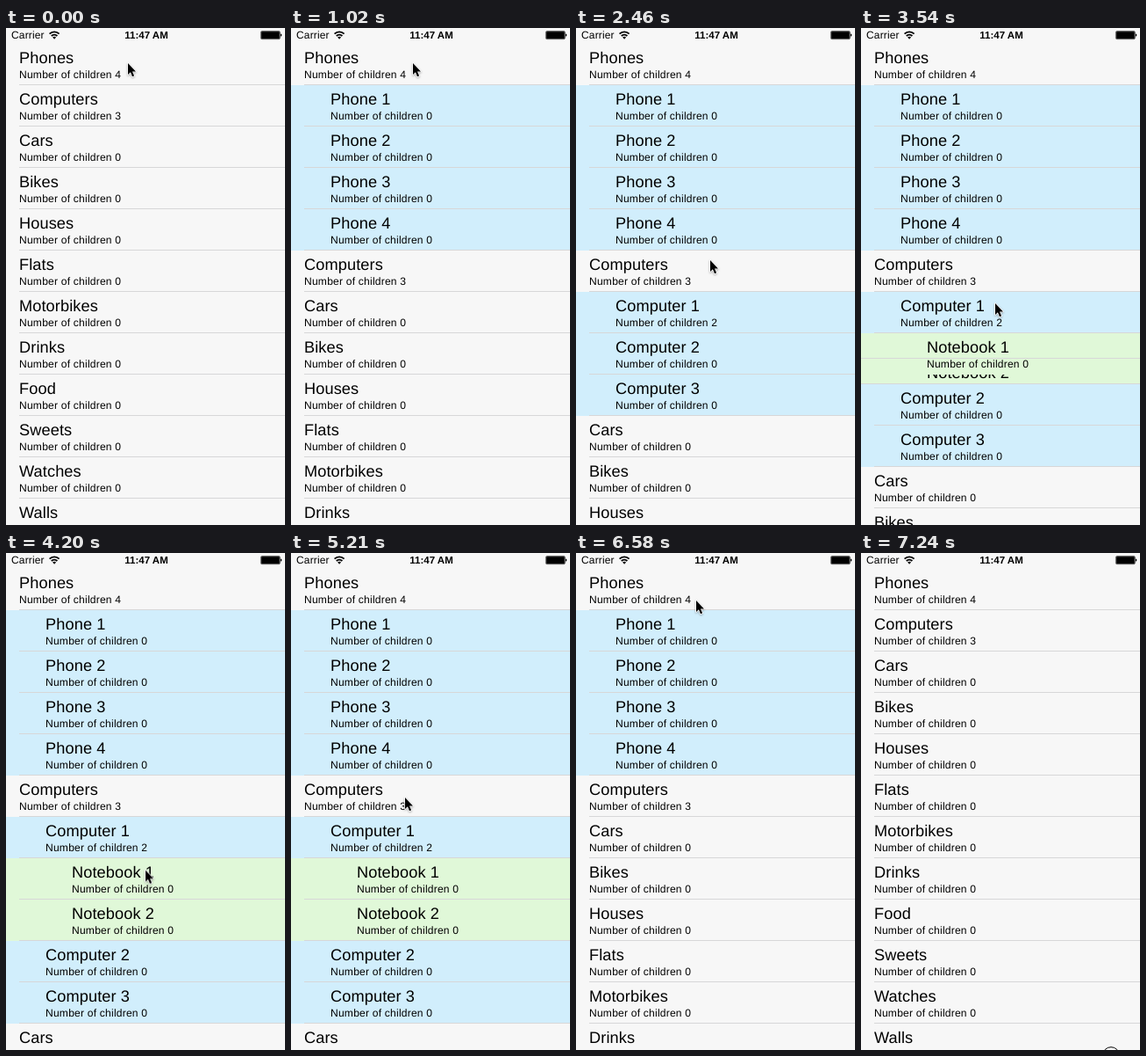
Write an HTML page that moves like this. It is 318 px wide and 565 px high and loops after 7300 ms.

```html
<!DOCTYPE html>
<html lang="en">
<head>
<meta charset="utf-8">
<title>Tree list</title>
<style>
@property --phones { syntax: "<number>"; inherits: true; initial-value: 0; }
@property --computers { syntax: "<number>"; inherits: true; initial-value: 0; }
@property --notebooks { syntax: "<number>"; inherits: true; initial-value: 0; }
html, body { margin: 0; width: 100%; height: 100%; overflow: hidden; background: #f7f7f7; }
#stage {
  position: relative; width: 318px; height: 565px; overflow: hidden;
  background: #f7f7f7; color: #000;
  font-family: "Liberation Sans", Arial, sans-serif;
  text-rendering: geometricPrecision;
  animation: phones 7300ms infinite, computers 7300ms infinite, notebooks 7300ms infinite;
}
.row { position: absolute; left: 0; width: 318px; height: 47px; white-space: nowrap; }
.row b, .row span { position: absolute; font-weight: 400; }
.row b { top: 6px; font-size: 18.2px; line-height: 20px; letter-spacing: .1px; }
.row span { top: 28px; font-size: 12.1px; line-height: 14px; letter-spacing: .2px; }
.d0 { background: #f7f7f7; }
.d1 { background: #d1eefc; }
.d2 { background: #e0f8d8; }
.d0 > * { left: 15px; }
.d1 > * { left: 45px; }
.d2 > * { left: 75px; }
.line { position: absolute; left: 15px; right: 0; height: 1px; background: #d7d7d8; z-index: 40; }
#bar { position: absolute; left: 0; top: 0; z-index: 50; }
#cursor {
  position: absolute; left: 0; top: 0; width: 1px; height: 1px; z-index: 60;
  animation: move 7300ms infinite;
}
#cursor svg { position: absolute; left: -10px; top: -12px; overflow: visible; }
#ring { animation: press 7300ms step-end infinite; }
#arrow { filter: drop-shadow(0 1px 1px rgba(0, 0, 0, .3)); }
</style>
</head>
<body>
<div id="stage">
  <svg id="bar" width="318" height="18" font-size="11.5">
    <text x="6" y="12.3" font-size="12" letter-spacing=".15">Carrier</text>
    <g fill="none" stroke="#000" stroke-width="1.9">
      <path d="M49.6 6.6a7.8 7.8 0 0 1 11 0M51.8 9a4.7 4.7 0 0 1 6.6 0"/>
    </g>
    <path d="M53.1 10.6a2.9 2.9 0 0 1 4 0l-2 2.1z"/>
    <text x="160" y="12" text-anchor="middle" font-weight="700">11:47 AM</text>
    <rect x="290.4" y="3.5" width="22" height="9.2" rx="1.5" fill="#777" stroke="#333" stroke-width=".6"/>
    <rect x="291.2" y="4.3" width="20.4" height="7.6" rx=".6"/>
    <path d="M313 6.4q1.4.4 1.4 1.7t-1.4 1.7z"/>
  </svg>
  <div id="cursor">
    <svg width="24" height="32" viewBox="-10 -12 24 32">
      <circle id="ring" cx="2" cy=".3" r="9.6" fill="none" stroke="#000"/>
      <path id="arrow" d="M1 1V14L3.9 11.3L6 16.2L8.1 15.3L6 10.5H10Z"
        stroke="#fff" stroke-width="1.6" stroke-linejoin="round" paint-order="stroke"/>
    </svg>
  </div>
</div>
<script>
const LOOP = 7300;
const stage = document.getElementById('stage');
const leaf = (name) => ({ name, kids: [] });
const numbered = (name, n) => Array.from({ length: n }, (_, i) => leaf(`${name} ${i + 1}`));
const branch = (name, key, kids) => ({ name, kids, open: `var(--${key})` });

const computers = numbered('Computer', 3);
computers[0] = branch('Computer 1', 'notebooks', numbered('Notebook', 2));
const tree = [
  branch('Phones', 'phones', numbered('Phone', 4)),
  branch('Computers', 'computers', computers),
  ...'Cars Bikes Houses Flats Motorbikes Drinks Food Sweets Watches Walls'.split(' ').map(leaf)
];

// Positions are calc() expressions in row units, driven by the open amounts.
const size = (n) => n.kids.length ? `(1 + ${n.open} * (${n.kids.map(size).join(' + ')}))` : '1';
const rows = [];

function place(nodes, start, scale, depth) {
  let run = '0';
  nodes.forEach((n, i) => {
    const y = `(${start} + ${scale} * (${run}))`;
    rows.push({ n, y, scale, depth, z: depth ? 30 - depth * 10 - i : 30 });
    if (n.kids.length) place(n.kids, `${y} + ${scale}`, `${scale} * ${n.open}`, depth + 1);
    run += ` + ${size(n)}`;
  });
}

function add(cls, css) {
  const el = document.createElement('div');
  el.className = cls;
  el.style.cssText = css;
  return stage.appendChild(el);
}

place(tree, '0', '1', 0);
rows.forEach(({ n, y, scale, depth, z }, i) => {
  const row = add(`row d${depth}`, `top: calc(18px + 47px * ${y}); z-index: ${z}`);
  row.innerHTML = `<b>${n.name}</b><span>Number of children ${n.kids.length}</span>`;
  if (!rows[i + 1]) return;
  // Separators of moving rows run the full width.
  const left = depth ? `left: max(0px, 15px - 9999px * (${scale}) * (1 - ${scale}));` : '';
  add('line', `${left} top: calc(17px + 47px * ${rows[i + 1].y})`);
});

const frames = (name, steps) =>
  `@keyframes ${name} {${steps.map(([t, css]) => `${t / LOOP * 100}% {${css}}`).join('\n')}}\n`;

const toggle = (key, open, close, ms = 300) => frames(key, [
  [0, 0], [open, 0], [open + 300, 1], [close, 1], [close + ms, 0], [LOOP, 0]
].map(([t, v]) => [t, `--${key}: ${v}; animation-timing-function: ease-in-out`]));

// The pointer rests, then eases to the next spot.
function pointer(x, y, moves) {
  const at = (t) => [t, `transform: translate(${x}px, ${y}px); animation-timing-function: ease-out`];
  const steps = [at(0)];
  for (const { from, to, spot } of moves) {
    steps.push(at(from));
    [x, y] = spot;
    steps.push(at(to));
  }
  return frames('move', [...steps, at(LOOP)]);
}

const press = (...spans) => frames('press', [[0, 'opacity: 0'],
  ...spans.flatMap(([down, up]) => [[down, 'opacity: 1'], [up, 'opacity: 0']])]);

const style = document.createElement('style');
style.textContent =
  toggle('phones', 720, 6580) +
  toggle('computers', 2160, 5450) +
  toggle('notebooks', 3370, 5800, 20) +
  press([600, 720], [2160, 2220], [3120, 3360], [5330, 5450], [6460, 6580], [7240, LOOP]) +
  pointer(138, 39, [
    { from: 1080, to: 1980, spot: [152, 263] },
    { from: 2480, to: 2940, spot: [152, 312] },
    { from: 3660, to: 4440, spot: [159, 367] },
    { from: 4560, to: 5210, spot: [129, 277] },
    { from: 5690, to: 6280, spot: [136, 53] },
    { from: 6590, to: 6880, spot: [283, 571] }
  ]);
document.head.appendChild(style);
</script>
</body>
</html>
```
